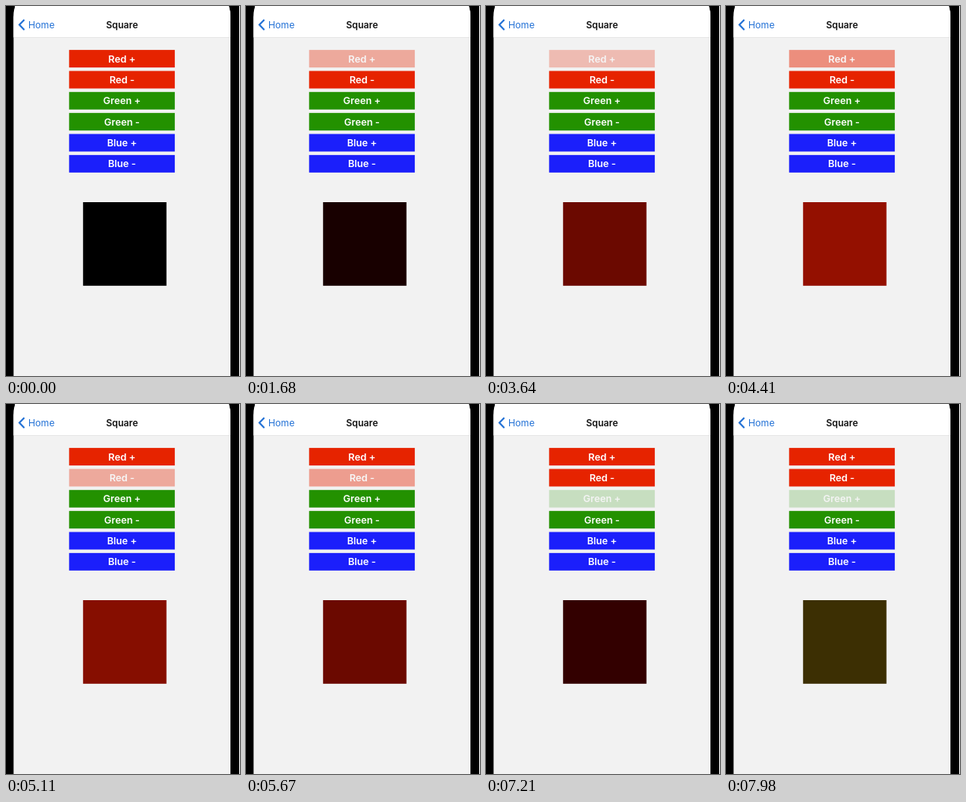
An HTML page that plays this animation: 294x464 px, repeating every 8000 ms.

```html
<!DOCTYPE html>
<html lang="en">
<head>
<meta charset="utf-8">
<title>Square</title>
<style>
  html, body { margin: 0; width: 100%; height: 100%; overflow: hidden; background: #000; }
  svg { display: block; width: 294px; height: 464px; font-family: Inter, "Liberation Sans", sans-serif; }
  .label { font-size: 12.3px; font-weight: 600; fill: #fff; text-anchor: middle; }
</style>
</head>
<body>
<svg viewBox="0 0 294 464">
  <rect width="294" height="464"/>
  <rect x="293" width="1" height="464" fill="#fff"/>
  <path d="M11.5 0Q9.5 6 9.5 14V464H282V14Q282 6 280 0Z" fill="#f2f2f2"/>
  <path d="M11.5 0Q9.5 6 9.5 14V39H282V14Q282 6 280 0Z" fill="#fff"/>
  <rect x="9.5" y="39" width="272.5" height=".5" fill="#d8d8d8"/>
  <path d="M23 17.2L16.8 23.6L23 30" fill="none" stroke="#2472d6" stroke-width="2.1"/>
  <text x="28" y="28.1" font-size="11.8" fill="#2472d6">Home</text>
  <text x="145.8" y="28.1" font-size="11.7" font-weight="600" text-anchor="middle" fill="#111">Square</text>
  <g id="buttons"></g>
  <rect id="square" x="96.8" y="246" width="104.8" height="104.8"/>
</svg>
<script>
const LOOP = 8000, HOLD = 70, FADE = 250, DIM = 0.2, STEP = 15;
const colors = { Red: '#e62300', Green: '#239100', Blue: '#1b1ffb' };

// Release times of the taps on each button.
const taps = {
  'Red +': [1605, 2020, 2432, 2735, 3028, 3312, 3593, 3838, 4073, 4307],
  'Red -': [5035, 5309, 5582, 5847, 6112, 6377, 6642],
  'Green +': [7215, 7473, 7735, 8020]
};

const group = document.getElementById('buttons');
const square = document.getElementById('square');
const buttons = {};

function add(parent, tag, attrs, text = '') {
  const el = document.createElementNS('http://www.w3.org/2000/svg', tag);
  for (const key in attrs) el.setAttribute(key, attrs[key]);
  el.textContent = text;
  return parent.appendChild(el);
}

Object.keys(colors).flatMap(c => [c + ' +', c + ' -']).forEach((name, i) => {
  const y = 55.1 + i * 26.35;
  const g = buttons[name] = add(group, 'g', {});
  add(g, 'rect', { x: 79.3, y, width: 132.8, height: 22, fill: colors[name.split(' ')[0]] });
  add(g, 'text', { x: 145.7, y: y + 15.6, class: 'label' }, name);
});

const easeInOut = p => p < 0.5 ? 2 * p * p : 1 - 2 * (1 - p) ** 2;

// A press dims at once; a release fades back.
function opacityAt(releases, t) {
  if (releases.some(r => t >= r - HOLD && t < r)) return DIM;
  const last = releases.filter(r => r <= t).pop();
  if (last === undefined) return 1;
  return DIM + (1 - DIM) * easeInOut(Math.min(1, (t - last) / FADE));
}

const count = (name, t) => taps[name].filter(r => r <= t).length;

// Screen tint of the mixed red and green levels.
function squareColor(t) {
  const r = STEP * (count('Red +', t) - count('Red -', t));
  const g = STEP * count('Green +', t);
  const red = (r ? 10 + 0.92 * r : 0) + 0.18 * g;
  const green = Math.max(0, 0.15 * (r - 45)) + 1.04 * g;
  return `rgb(${[red, green, 0.07 * g].map(Math.round)})`;
}

function draw(now) {
  const t = now % LOOP;
  for (const name in taps) buttons[name].setAttribute('opacity', opacityAt(taps[name], t));
  square.setAttribute('fill', squareColor(t));
  requestAnimationFrame(draw);
}
draw(0);
</script>
</body>
</html>
```
